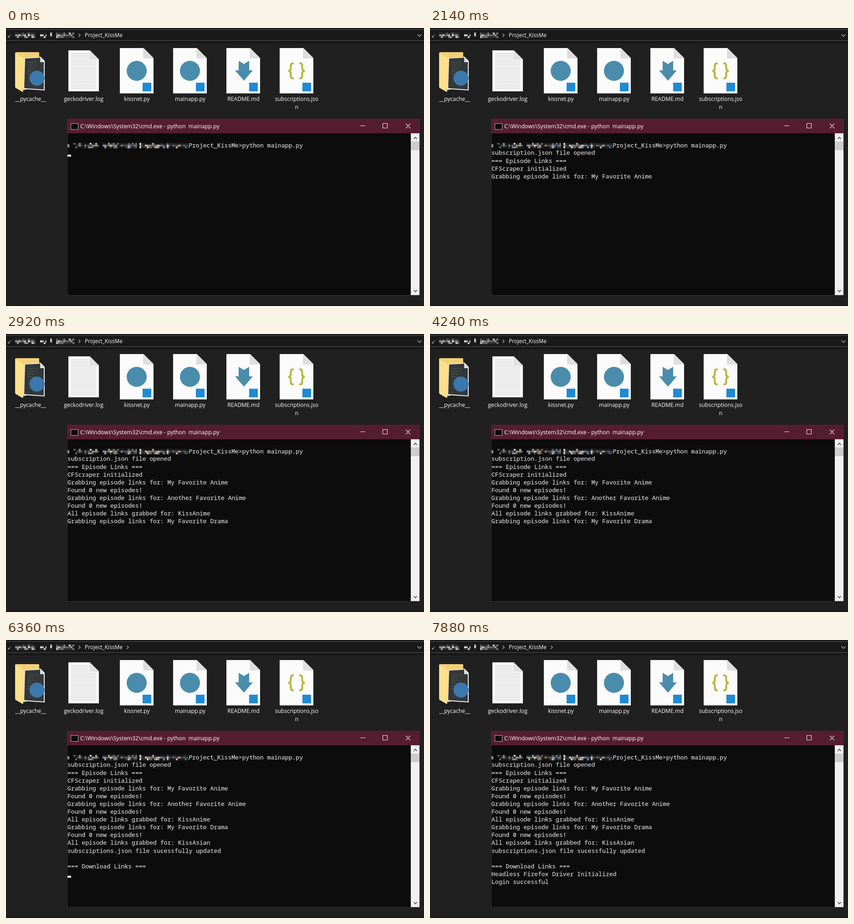
An HTML page for the animation above (8000 ms loop, 918 by 610 pixels).

```html
<!DOCTYPE html>
<html lang="en">
<head>
<meta charset="utf-8">
<title>Console run</title>
<style>
  html, body { margin: 0; width: 100%; height: 100%; overflow: hidden; background: #202020; }
  svg { display: block; width: 918px; height: 610px; }
  text { white-space: pre; }
  .ui { font: 12.2px "Open Sans", "Noto Sans", sans-serif; fill: #ffffff; }
  .mid { text-anchor: middle; }
  .con {
    font: 13.07px "Noto Sans Mono", "DejaVu Sans Mono", monospace;
    fill: #cccccc; stroke: #cccccc; stroke-width: 0.25px;
  }
</style>
</head>
<body>
<svg id="stage" viewBox="0 0 918 610" xmlns="http://www.w3.org/2000/svg"></svg>
<script>
const NS = 'http://www.w3.org/2000/svg';
const stage = document.getElementById('stage');
const LOOP = 8000, LEFT = 135, CELL = 7.843, ROW = 17.1;

function add(tag, attrs, content) {
  const el = document.createElementNS(NS, tag);
  for (const key in attrs) el.setAttribute(key, attrs[key]);
  if (content) el.textContent = content;
  stage.appendChild(el);
  return el;
}
const rect = (x, y, width, height, fill, more) => add('rect', { x, y, width, height, fill, ...more });
const path = (d, fill, more) => add('path', { d, fill, ...more });
const stroke = (d, color, width, more) =>
  path(d, 'none', { stroke: color, 'stroke-width': width, ...more });
const label = (x, y, s, cls, more) => add('text', { x, y, class: cls, ...more }, s);
const disc = (cx, cy, r, fill) => add('circle', { cx, cy, r, fill });

let seed = 11;
function rand() {
  seed = (seed * 16807) % 2147483647;
  return seed / 2147483647;
}

// Censored text: three rows of hard-edged blocks, the middle one fullest
function mosaic(x0, x1, y, tints) {
  const size = 4;
  for (let x = x0; x < x1 - 1; x += size) {
    [0.2, 0.85, 0.5].forEach((chance, row) => {
      const tint = tints[Math.floor(rand() * tints.length)];
      const opacity = (rand() < chance ? 0.45 + 0.5 * rand() : 0.1).toFixed(2);
      rect(x, y + row * size, Math.min(size, x1 - x), size, tint,
        { opacity, 'shape-rendering': 'crispEdges' });
    });
  }
}

function addressBar() {
  rect(0, 0, 918, 610, '#202020');
  rect(0, 0, 918, 34, '#191919');
  rect(-1, 3.5, 920, 24, '#191919', { stroke: '#535353' });
  rect(0, 34, 1, 576, '#161616');
  rect(0, 608, 918, 2, '#181818');
  const grays = ['#d8d8d8', '#a0a0a0', '#707070', '#efefef'];
  rect(4, 17, 4, 4, '#777');
  rect(8, 13, 3, 4, '#444');
  [[20, 64], [75, 89], [97, 101], [110, 150]].forEach(([a, b]) => mosaic(a, b, 10, grays));
  stroke('M159.5 12.5l3.5 3.5-3.5 3.5', '#b8b8b8', 1.3);
  label(173, 20, 'Project_KissMe', 'ui', { style: 'font-size:11.9px' });
  stroke('M903.5 14l4.5 4.5 4.5-4.5', '#a8a8a8', 1.5);
}

function folder() {
  path('M20 55q0-2 2-2H71q2 0 2 2V128L40 136 20 128Z', '#f3cf76');
  path('M41 66L76 63 85 72V137L39 134Z', '#f1f1f1');
  path('M42 67L75 65 83 74V135L40 132Z', '#34383a');
  path('M75 64V75H85Z', '#d9dcdd');
  for (let y = 76; y < 110; y += 6) {
    stroke(`M48 ${y}h${(5 + 9 * rand()).toFixed(1)}m3 0h4`, '#4c6a50', 1.2);
  }
  path('M20 55L38 65Q40.5 67 40.5 70L38 138Q38 141 35 139.5L22 132Q20 131 20 129Z', '#fde08c');
  disc(68, 110, 16.5, '#3b78ae');
  label(54, 159.5, '__pycache__', 'ui mid');
}

function logFile() {
  path('M137 49H184L204 69V139H137Z', '#fbfbfb');
  for (let y = 56; y < 134; y += 3.35) {
    stroke(`M143 ${y.toFixed(1)}H${y < 70 ? 182 : 198}`, '#c6c6c6', 1);
  }
  path('M184 49L204 69H184Z', '#e2e2e2', { stroke: '#c8c8c8', 'stroke-width': 0.7 });
  label(170.5, 159.5, 'geckodriver.log', 'ui mid');
}

function page(x, name) {
  path(`M${x} 44h52l22 22v77.5h-74Z`, '#fbfbfb');
  path(`M${x + 52} 44l22 22h-22Z`, '#dedede', { stroke: '#c9c9c9', 'stroke-width': 0.7 });
  rect(x + 50, 120, 19, 19, '#1f8ad2');
  label(x + 37.5, 159.5, name, 'ui mid');
}

function files() {
  folder();
  logFile();
  page(250, 'kissnet.py');
  disc(287, 94, 22, '#4a8cab');
  page(367, 'mainapp.py');
  disc(404, 94, 22, '#4a8cab');
  page(484, 'README.md');
  path('M511 72L522.5 79 534 72V93H542L522.5 115.5 503 93H511Z', '#4a8cab');
  page(601, 'subscriptions.jso');
  label(638.5, 177.5, 'n', 'ui mid');
  const brace = 'M632 77.5h-2q-4.5 0-4.5 5v5q0 6-5.5 6.5q5.5 .5 5.5 6.5v5q0 5 4.5 5h2';
  stroke(brace, '#b9b63c', 4.2);
  stroke(brace, '#b9b63c', 4.2, { transform: 'translate(1276 0) scale(-1 1)' });
}

function consoleWindow() {
  rect(134.5, 199.5, 774, 387, '#0c0c0c', { stroke: '#5d2036' });
  rect(134, 199, 775, 32, '#551d30');
  rect(142.5, 209.5, 16, 13, '#0b0b0b', { stroke: '#b4b4b4' });
  label(163, 220, 'C:\\Windows\\System32\\cmd.exe - python  mainapp.py', 'ui',
    { style: 'font-size:12.34px' });
  stroke('M778 214.5h11M827.5 209.5h10v10h-10ZM878 210l10 10m0-10l-10 10', '#f2f2f2', 1.1);

  rect(889, 231, 19, 355, '#f0f0f0');
  rect(889, 249, 19, 19, '#cdcdcd');
  stroke('M895.5 243.5l3.5-4 3.5 4M895.5 575l3.5 4 3.5-4', '#505050', 1.8);

  const tints = ['#d9d9d9', '#8d8d8d', '#c09468', '#5d8fc5', '#e6e2da', '#5a5a5a'];
  rect(135, 255, 4, 7, '#8c8c8c');
  rect(148, 252, 4, 4, '#55606c');
  [[152, 205], [212, 289], [293, 397]].forEach(([a, b]) => mosaic(a, b, 252, tints));
  stroke('M398 256l2.5 7', '#8a8a8a', 1.2);
  label(401.2, 261.5, 'Project_KissMe>python mainapp.py', 'con');
}

// [time shown, text], one entry per console row
const output = [
  [310, 'subscription.json file opened'],
  [310, '=== Episode Links ==='],
  [310, 'CFScraper initialized'],
  [310, 'Grabbing episode links for: My Favorite Anime'],
  [2220, 'Found 0 new episodes!'],
  [2220, 'Grabbing episode links for: Another Favorite Anime'],
  [2920, 'Found 0 new episodes!'],
  [2920, 'All episode links grabbed for: KissAnime'],
  [2920, 'Grabbing episode links for: My Favorite Drama'],
  [4640, 'Found 0 new episodes!'],
  [4640, 'All episode links grabbed for: KissAsian'],
  [4640, 'subscriptions.json file sucessfully updated'],
  [4640, ''],
  [4640, '=== Download Links ==='],
  [6670, 'Headless Firefox Driver Initialized'],
  [7880, 'Login successful']
];

// [time, row, column]; no row means hidden
const blinks = [
  [0, 1, 0], [310, 5, 0], [1040], [1590, 5, 0], [2140], [3710, 10, 0], [4240],
  [5330, 15, 0], [5800], [6360, 15, 0], [6670, 15, 35], [6760, 16, 0], [7320]
];

addressBar();
files();
consoleWindow();
const crumb = stroke('M265.5 12.5l3.5 3.5-3.5 3.5', '#b8b8b8', 1.3);
const lines = output.map(([, s], i) => label(LEFT, (278.4 + i * ROW).toFixed(2), s, 'con'));
const cursor = rect(LEFT, 278, 7.9, 4.3, '#f2f2f2');

const show = (el, on) => el.setAttribute('visibility', on ? 'visible' : 'hidden');

function draw(t) {
  lines.forEach((el, i) => show(el, t >= output[i][0]));
  show(crumb, t >= 5880);
  const [, row, col] = blinks.filter(b => b[0] <= t).pop();
  show(cursor, row);
  if (row) {
    cursor.setAttribute('x', LEFT + col * CELL);
    cursor.setAttribute('y', 277.9 + (row - 1) * ROW);
  }
}

const start = performance.now();
function tick() {
  draw((performance.now() - start) % LOOP);
  requestAnimationFrame(tick);
}
tick();
</script>
</body>
</html>
```
